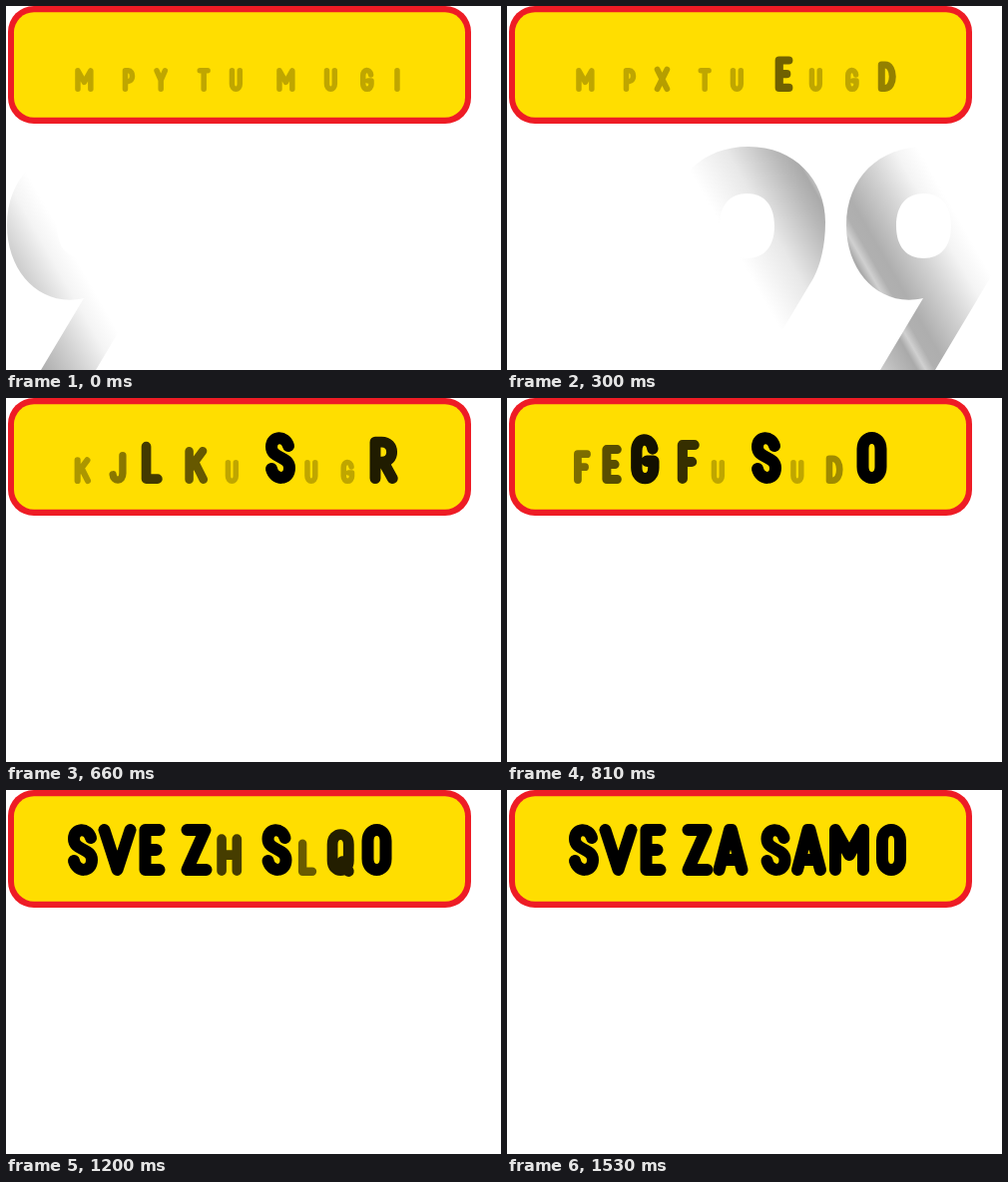
Animation of 496x365 px, one loop 4.47 s. Source, as an HTML page with a canvas:

```html
<!DOCTYPE html>
<html lang="sr">
<head>
<meta charset="utf-8">
<title>Sve za samo</title>
<style>
  html, body { margin: 0; width: 100%; height: 100%; overflow: hidden; background: #fff; }
  canvas { display: block; }
</style>
</head>
<body>
<canvas id="stage" width="496" height="365" role="img" aria-label="SVE ZA SAMO 99"></canvas>
<script>
const ctx = document.getElementById('stage').getContext('2d');

const LOOP = 4470, STEP = 30, LAST = 1530;
const TEXT = 'SVE ZA SAMO';
const ORDER = [5, 8, 2, 3, 1, 0, 7, 4, 6];   // order in which letters settle
const RAMP = 600, FIRST = 50, GAP = 110;
const SHIFT = 20, MIN_SCALE = 0.46, MIN_ALPHA = 0.25;
const LEFT = 60.5, BASE = 86, SPACE = 11, ANCHOR = 14, WEIGHT = 12;

// Rounded lettering as centre lines: [width, left bearing, right bearing, path]
const O = 'M0 11C0-3.7 18-3.7 18 11V29C18 43.7 0 43.7 0 29Z';
const GLYPHS = {
  A: [23, 0, 0.5, 'M0 40L10.5 0H12.5L23 40M4 30H19'],
  B: [18, 2.5, 2, 'M0 0V40H8C22 40 22 19 7 19H0M7 19C19 19 19 0 7 0H0'],
  C: [18, 2, 2, 'M18 10C16-3 0-4 0 11V29C0 44 16 43 18 30'],
  D: [19, 2.5, 3, 'M0 0V40H6C23 40 23 0 6 0Z'],
  E: [14, 2.5, 3, 'M14 0H0V40H14M0 20H11'],
  F: [14, 2.5, 1, 'M14 0H0V40M0 20H11'],
  G: [18, 2, 2, 'M17 9C15-4 0-4 0 11V29C0 44 18 44 18 29V22H11'],
  H: [19, 2.5, 4, 'M0 0V40M19 0V40M0 20H19'],
  I: [0, 2.5, 4, 'M0 0V40'],
  J: [16, 0, 5, 'M16 0V29C16 43 1 43 0 31'],
  K: [20, 2.5, 3, 'M0 0V40M19 0L2 23M8 16L20 40'],
  L: [14, 2.5, 3, 'M0 0V40H14'],
  M: [28, 2.5, 5, 'M0 40V0L14 25L28 0V40'],
  N: [19, 2.5, 4, 'M0 40V0L19 40V0'],
  O: [18, 2, 3, O],
  P: [15, 2.5, 3, 'M0 40V0H7C18 0 18 23 7 23H0'],
  Q: [18, 2, 4, O + 'M11 30L18 41'],
  R: [19, 2.5, 1, 'M0 40V0H7C22 0 22 22 7 22H0M9 22L19 40'],
  S: [18, 1.5, 0.5, 'M17 8C14-3 0-2 0 9C0 21 18 18 18 30C18 43 3 43 0 31'],
  T: [17, 1, 1.5, 'M0 0H17M8.5 0V40'],
  U: [17, 2.5, 5, 'M0 0V29C0 44 17 44 17 29V0'],
  V: [26, 0, 0.5, 'M0 0L13 40L26 0'],
  W: [39, 0, 0.5, 'M0 0L9 40L19.5 8L30 40L39 0'],
  X: [20, 0, 0, 'M0 0L20 40M20 0L0 40'],
  Y: [18, 0.5, 1.5, 'M0 0L9 21L18 0M9 21V40'],
  Z: [19, 2, 0, 'M0 0H18L0 40H19']
};
for (const key in GLYPHS) GLYPHS[key][3] = new Path2D(GLYPHS[key][3]);

const NINE = new Path2D(
  'M78 293C35 303 1 267 1 220C1 172 34 141 80 141C126 141 157 174 157 217' +
  'C157 240 152 260 145 273L90 365H35Z' +
  'M78.5 188C95 188 106 199 106 220.5S95 253 78.5 253S51 242 51 220.5S62 188 78.5 188Z');
const NINE_X = [0, 162, 339];

const SHEEN = [[0, 255], [0.2, 232], [0.4, 184], [0.47, 170], [0.505, 208],
  [0.545, 176], [0.6, 174], [0.76, 210], [0.9, 244], [1, 255]];
const DIR = { x: 0.868, y: -0.497 }, HALF = 105;

const clamp = v => Math.min(1, Math.max(0, v));

function drawNines(t) {
  const mid = -170 + 0.574 * t + 0.001994 * t * t;
  const a = mid - HALF, b = mid + HALF;
  if (a > 360) return;
  const fill = ctx.createLinearGradient(DIR.x * a, DIR.y * a, DIR.x * b, DIR.y * b);
  for (const [at, v] of SHEEN) fill.addColorStop(at, `rgb(${v},${v},${v})`);
  ctx.fillStyle = fill;
  for (const x of NINE_X) {
    const digit = new Path2D();
    digit.addPath(NINE, new DOMMatrix([1, 0, 0, 1, x, 0]));
    ctx.fill(digit, 'evenodd');
  }
}

function box(x, y, w, h, r, color) {
  ctx.beginPath();
  ctx.roundRect(x, y, w, h, r);
  ctx.fillStyle = color;
  ctx.fill();
}

function drawPanel() {
  box(2, 0, 464, 118, 26, '#ee1c25');
  box(8, 6.3, 452, 105.4, 20, '#ffde00');
}

function drawText(t) {
  let pen = LEFT, i = 0;
  ctx.lineWidth = WEIGHT;
  ctx.lineCap = ctx.lineJoin = 'round';
  for (const ch of TEXT) {
    if (ch === ' ') { pen += SPACE; continue; }
    const p = clamp((t - FIRST - GAP * ORDER.indexOf(i++)) / RAMP);
    const code = (ch.charCodeAt(0) - 65 + Math.round(SHIFT * (1 - p))) % 26;
    const [width, before, after, path] = GLYPHS[String.fromCharCode(65 + code)];
    const scale = MIN_SCALE + (1 - MIN_SCALE) * p;
    ctx.save();
    ctx.globalAlpha = MIN_ALPHA + (1 - MIN_ALPHA) * p;
    ctx.translate(pen + ANCHOR, BASE);
    ctx.scale(scale, scale);
    ctx.translate(before + 6 - ANCHOR, -46);
    ctx.stroke(path);
    ctx.restore();
    pen += before + width + 12 + after;
  }
}

function draw(t) {
  ctx.fillStyle = '#fff';
  ctx.fillRect(0, 0, 496, 365);
  drawNines(t);
  drawPanel();
  drawText(t);
}

const start = performance.now();
function tick() {
  const t = (performance.now() - start) % LOOP;
  draw(Math.min(LAST, Math.floor(t / STEP) * STEP));
  requestAnimationFrame(tick);
}
tick();
</script>
</body>
</html>
```
